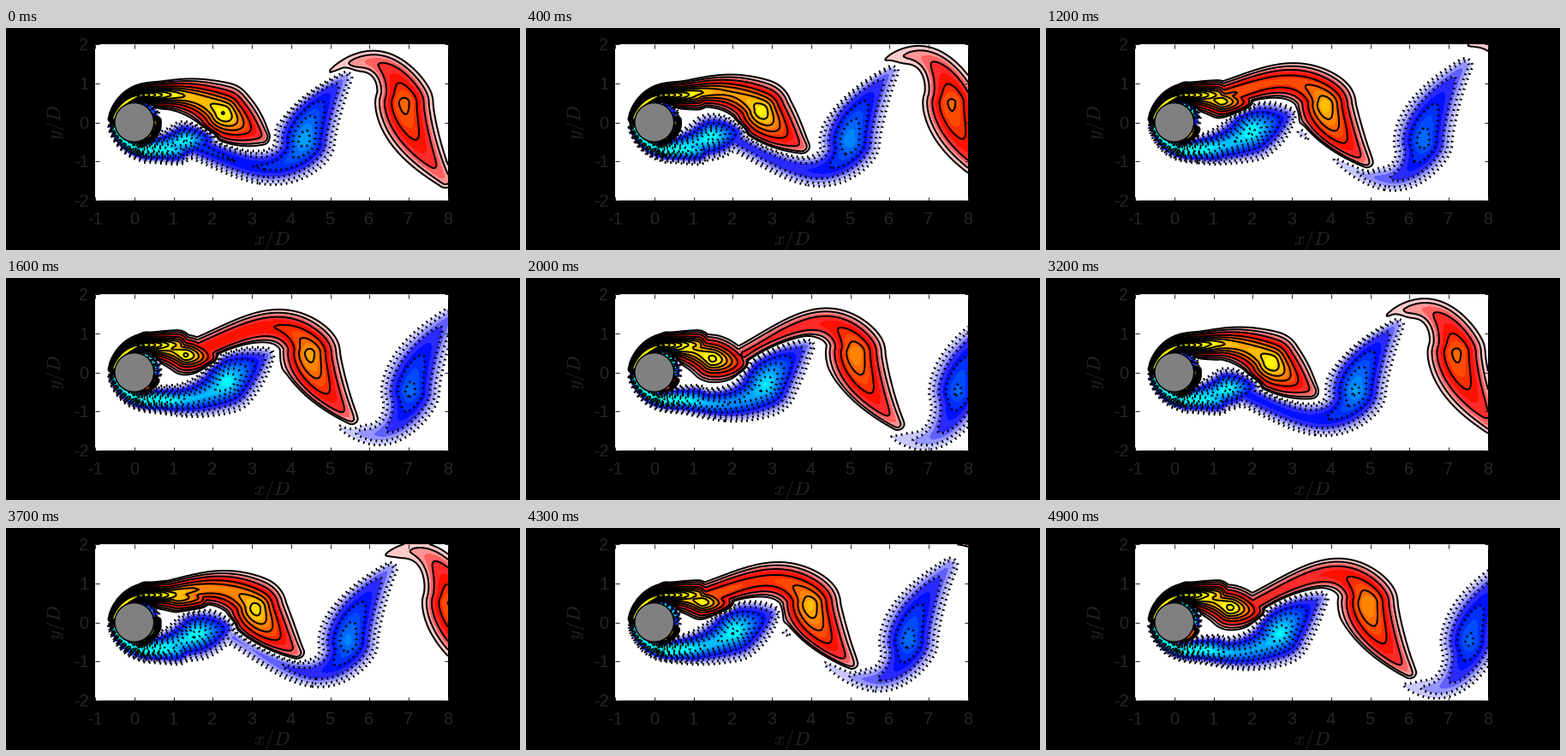
Recreate the animation shown at these times as a matplotlib script. Size 600x260 px, loop 5 s.

```python
import numpy as np
import matplotlib.pyplot as plt
from matplotlib.animation import FuncAnimation
from matplotlib.patches import Circle

plt.rcParams["font.family"] = "Liberation Sans"
plt.rcParams["mathtext.fontset"] = "cm"

WIDTH, HEIGHT, DPI = 600, 260, 100
FRAMES, INTERVAL = 50, 100
PERIOD = 3.02            # shedding period in seconds
OLDEST, YOUNGEST = 4.5, -2.4
INK = "#262626"
PX = 72 / DPI            # one pixel in points

gx = np.linspace(-1, 8, 226, dtype=np.float32)
gy = np.linspace(-2, 2, 101, dtype=np.float32)


def ramp(t, start, soft):
    """Zero before start, then rising with slope one; soft corner."""
    return soft * np.log1p(np.exp((t - start) / soft))


def step(t, middle, soft):
    return (1 + np.tanh((t - middle) / soft)) / 2


def bump(t, middle, width):
    return np.exp(-((t - middle) / width) ** 2)


def vortex(age):
    """Ribbon of one vortex as rows of x, y, radius, log strength."""
    growth = step(age, -1.0, 0.9)       # rolling up behind the cylinder
    tilt = step(age, 0.5, 1.2)          # turning upright downstream
    early = step(-age, 2.0, 0.6)        # still part of the shear layer
    bend = 1 + 0.6 * tilt

    core_x = 1 + 1.77 * ramp(age, -0.29, 0.8)
    core_y = 0.5 - 0.27 * bump(age, -0.2, 1.1) + 0.2 * early
    core_r = 0.22 + 0.24 * growth
    core_a = np.log(1.5 + 1.8 * step(-age, -1.2, 1.4)) - 0.4 * early

    # From the core forward to the leading tip.
    s = np.linspace(1, 0, 32, endpoint=False)
    tip_r = 0.2
    tip_a = np.log(0.35 + 0.11 * np.exp(-age))
    front = np.column_stack([
        core_x + (0.5 + 0.55 * growth) * s ** bend,
        core_y - 2 * tilt * s,
        tip_r + (core_r - tip_r) * (1 - s ** 2),
        core_a + (tip_a - core_a) * s ** 1.5])

    # From the core over the crest to the trailing braid.
    q = np.linspace(0, 1, 64)
    end_x = 0.3 + 1.4 * ramp(age, 0.6, 0.5)
    end_y = 0.7 - 0.5 * step(age, 2.0, 0.6)
    end_r = 0.17 + 0.08 * bump(age, 1.4, 0.8)
    end_a = 1.6 - 1.25 * ramp(age, 0.35, 0.4)
    arch = 0.42 * ramp(age, 0.2, 0.7)
    back = np.column_stack([
        core_x + (end_x - core_x) * q ** bend,
        core_y + (end_y - core_y) * q + arch * np.sin(np.pi * q),
        end_r + (core_r - end_r) * (1 - q) ** (1 + tilt),
        core_a + (end_a - core_a) * q - 0.4 * np.sin(np.pi * q)])
    return np.vstack([front, back])


def shear_layer():
    """Attached layer from the nose over the shoulder of the cylinder."""
    s = np.linspace(0, 1, 70)
    return np.column_stack([
        -0.55 + 1.65 * s ** 1.5,
        0.7 * np.sin(np.pi / 2 * np.minimum(1, 1.5 * s)),
        0.05 + 0.17 * s,
        np.log(8) - 1.2 * s ** 2])


def rear_layer(t):
    angle = np.radians(np.linspace(-68, 5, 24))
    strength = 3 * (1 + 0.5 * np.cos(2 * np.pi * (t - 0.3) / PERIOD))
    return np.column_stack([0.53 * np.cos(angle), 0.53 * np.sin(angle),
                            np.full(24, 0.085),
                            np.full(24, np.log(strength))])


def brush(log_field, curve):
    """Lay Gaussian blobs along a curve, keeping the strongest."""
    for x, y, r, log_a in curve.astype(np.float32):
        row = log_a - ((gx - x) / r) ** 2
        col = ((gy - y) / r) ** 2
        np.maximum(log_field, row[None, :] - col[:, None], out=log_field)


attached = np.full((gy.size, gx.size), -9, dtype=np.float32)
brush(attached, shear_layer())


def positive_vorticity(t):
    log_field = attached.copy()
    brush(log_field, rear_layer(t))
    for cycle in (-1, 0, 1):
        age = t % PERIOD + cycle * PERIOD
        if YOUNGEST <= age <= OLDEST:
            brush(log_field, vortex(age))
    return np.exp(log_field)


def vorticity(t):
    """The lower row mirrors the upper one half a period later."""
    return (positive_vorticity(t)
            - positive_vorticity(t + PERIOD / 2)[::-1])


def warm(value):
    """White to red to yellow."""
    pale = np.interp(value, [0.12, 0.6], [0.8, 0])
    return 1, max(pale, np.clip((value - 0.6) / 2.2, 0, 1)), pale


LINES = np.r_[0.125, 0.25, np.arange(0.5, 5.6, 0.5)]
BANDS = np.r_[0.125, 0.25, 0.375, np.arange(0.5, 3.1, 0.25), 20]
reds = [warm(v) for v in BANDS[:-1]]
blues = [color[::-1] for color in reds]
fill_levels = np.r_[-BANDS[::-1], BANDS]
fill_colors = blues[::-1] + [(1, 1, 1)] + reds

fig = plt.figure(figsize=(WIDTH / DPI, HEIGHT / DPI), dpi=DPI,
                 facecolor="black")
ax = fig.add_axes([104 / WIDTH, 58 / HEIGHT, 412 / WIDTH, 183 / HEIGHT])
ax.set(xlim=(-1, 8), ylim=(-2, 2), xticks=range(-1, 9), yticks=range(-2, 3))
ax.set_axisbelow(False)
ax.tick_params(direction="in", length=4.5 * PX, width=PX, color=INK,
               top=True, right=True, labelbottom=False, labelleft=False)
ax.spines[:].set_visible(False)
ax.add_patch(Circle((0, 0), 0.5, facecolor="#808080", edgecolor="black",
                    linewidth=1.5 * PX, zorder=4))


def label(px, py, text, size, **kw):
    fig.text(px / WIDTH, 1 - py / HEIGHT, text, color=INK,
             fontsize=size * PX, va="center", **kw)


for n in range(-1, 9):
    label(149.5 + 45.75 * n, 224, str(n), 20, ha="center")
for n in range(-2, 3):
    label(96.5, 112 - 45.7 * n, str(n), 20, ha="right")
label(310.5, 248.5, "$x/D$", 22, ha="center")
label(58.5, 110, "$y/D$", 22, ha="center", rotation=90)

drawn = []


def draw(frame):
    while drawn:
        drawn.pop().remove()
    w = np.clip(vorticity(frame * INTERVAL / 1000), -15, 15)
    drawn.append(ax.contourf(gx, gy, w, levels=fill_levels,
                             colors=fill_colors, zorder=1))
    dotted = ax.contour(gx, gy, w, levels=-LINES[::-1], colors="black",
                        linewidths=3 * PX, zorder=2)
    dotted.set_linestyle((0, (0.6, 1.5)))
    drawn.append(dotted)
    drawn.append(ax.contour(gx, gy, w, levels=LINES, colors="black",
                            linewidths=2 * PX, linestyles="solid", zorder=2))
    return drawn


anim = FuncAnimation(fig, draw, frames=FRAMES, interval=INTERVAL,
                     repeat=True, repeat_delay=0, blit=False)
plt.show()
```
